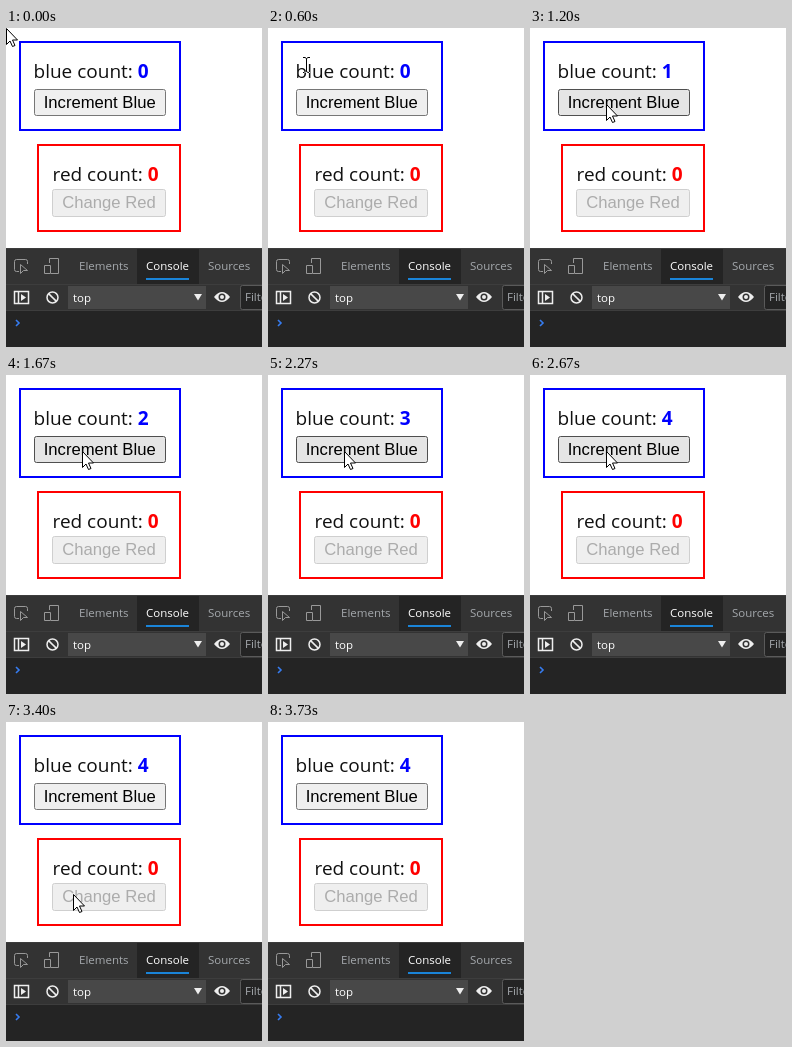
Recreate the animation shown at these times as an HTML page. Size 256 px wide and 319 px high, loop 4.34 s.

```html
<!DOCTYPE html>
<html lang="en">
<head>
<meta charset="utf-8">
<title>Counters</title>
<style>
  html, body { margin: 0; width: 100%; height: 100%; overflow: hidden; background: #fff; }
  svg { display: block; width: 256px; height: 319px; }
  .label { font: 19px "Open Sans", "Noto Sans", sans-serif; fill: #111; }
  .label tspan { font-weight: 700; }
  .button text { font: 16.667px "Liberation Sans", sans-serif; text-anchor: middle; }
  .button rect { fill: #efefef; stroke: #767676; }
  .button.hover rect { fill: #e5e5e5; stroke: #4f4f4f; }
  .button.pressed rect { fill: #f5f5f5; stroke: #8d8d8d; }
  .button.disabled rect { stroke: #cfcfcf; }
  .button.disabled text { fill: #acacac; }
  .tools text { font: 11.5px "Open Sans", "Noto Sans", sans-serif; fill: #a5a9ad; }
  .tools text.bright { fill: #fff; }
  .icon { fill: none; stroke: #999; }
  .icon.light { stroke: #eee; stroke-width: 1.5; }
  #beam { fill: none; stroke: #fff; mix-blend-mode: difference; }
</style>
</head>
<body>
<svg viewBox="0 0 256 319">
  <rect width="256" height="319" fill="#fff"/>

  <rect x="14" y="14" width="160" height="88" fill="none" stroke="#00f" stroke-width="2"/>
  <text class="label" x="27.5" y="50">blue count: <tspan id="count" fill="#00f">0</tspan></text>
  <g class="button" id="increment">
    <rect x="28.5" y="61.5" width="131" height="26" rx="2"/>
    <text x="93.7" y="80">Increment Blue</text>
  </g>

  <rect x="32" y="117" width="142" height="86" fill="none" stroke="#f00" stroke-width="2"/>
  <text class="label" x="46.5" y="153">red count: <tspan fill="#f00">0</tspan></text>
  <g class="button disabled">
    <rect x="46.5" y="161.5" width="113" height="27" rx="2"/>
    <text x="103" y="180">Change Red</text>
  </g>

  <g class="tools">
    <rect y="220" width="256" height="99" fill="#242424"/>
    <rect y="220" width="256" height="63" fill="#333"/>
    <rect x="131" y="220" width="62" height="36" fill="#242424"/>
    <path d="M0 220.5H256M0 256.5H256M0 282.5H256" stroke="#3d3d3d"/>
    <rect x="140" y="250" width="43" height="2" fill="#1a84d8"/>
    <text x="73" y="242">Elements</text>
    <text x="140" y="242" class="bright">Console</text>
    <text x="202" y="242">Sources</text>

    <path class="icon" d="M13 243.5H10.5Q8.5 243.5 8.5 241.5V233.5Q8.5 231.5 10.5 231.5H19.5Q21.5 231.5 21.5 233.5V236M14.5 236.5V245.5L17.5 242.5H21.5Z"/>
    <path class="icon" d="M43.5 235V230.5H52.5V245.5H45M38.5 237.5H44.5V245.5H38.5Z"/>

    <path class="icon light" d="M8.5 263.5H22.5V275.5H8.5ZM12.5 263.5V275.5"/>
    <path d="M15 266L20 269.5L15 273Z" fill="#eee"/>
    <circle class="icon light" cx="46.5" cy="269.5" r="5.5"/>
    <path class="icon light" d="M42.6 265.6L50.4 273.4"/>

    <rect x="62" y="258" width="138" height="23" fill="#484848"/>
    <text x="67" y="274" class="bright">top</text>
    <path d="M188 266H196L192 272.5Z" fill="#eee"/>
    <path d="M208 269Q216 259 224 269Q216 279 208 269Z" fill="#eee"/>
    <circle cx="216" cy="269" r="3.5" fill="#333"/>
    <circle cx="216" cy="269" r="2" fill="#eee"/>
    <rect x="234.5" y="257.5" width="40" height="24" rx="2" fill="#242424" stroke="#5a5a5a"/>
    <text x="239" y="273">Filter</text>
    <path d="M10 292L13 295L10 298" fill="none" stroke="#367cf1" stroke-width="1.6"/>
  </g>

  <path id="arrow" d="M.5.5V16.5L4 13L6.5 18.5L9 17.5L6.5 12H11.5Z" fill="#fff" stroke="#000"/>
  <path id="beam" d="M-3-7.5H-1L.5-6.5L2-7.5H4M.5-6.5V6.5M-3 7.5H-1L.5 6.5L2 7.5H4"/>
</svg>
<script>
const LOOP = 4340;
const TICKS_PER_MS = 15 / 1000;
const [count, increment, arrow, beam] =
  ["count", "increment", "arrow", "beam"].map(id => document.getElementById(id));

// Pointer legs in ticks; the control point bends the path and sets its easing.
const corner = [0, 0], onBlue = [76, 76], onRed = [67, 172], outside = [-40, 295];
const legs = [
  { start: 5, end: 14, from: corner, via: [46, 44], to: onBlue },
  { start: 46, end: 51, from: onBlue, via: [75, 95], to: onRed },
  { start: 51, end: 56, from: onRed, via: [345, 310], to: outside }
];
const clicks = [
  { down: 17, up: 18 }, { down: 24, up: 25 }, { down: 32, up: 34 }, { down: 39, up: 40 }
];

function pointerAt(tick) {
  const { start, end, from, via, to } = legs.findLast(leg => tick >= leg.start) ?? legs[0];
  const u = Math.min(1, Math.max(0, (tick - start) / (end - start)));
  const v = 1 - u;
  return from.map((p, i) => Math.round(v * v * p + 2 * u * v * via[i] + u * u * to[i]));
}

const inside = (x, y, left, top, right, bottom) =>
  x >= left && x < right && y >= top && y < bottom;

function draw(time) {
  // The small lead absorbs tick times rounded to 10 ms.
  const tick = Math.floor((time % LOOP + 5) * TICKS_PER_MS);
  const [x, y] = pointerAt(tick);
  const overText = inside(x, y, 28, 30, 144, 55) || inside(x, y, 46, 134, 153, 159);
  const hover = inside(x, y, 28, 61, 160, 88);
  const pressed = clicks.some(({ down, up }) => tick >= down && tick < up);

  count.textContent = clicks.filter(({ up }) => tick >= up).length;
  increment.setAttribute("class", "button" + (pressed ? " pressed" : hover ? " hover" : ""));
  for (const shape of [arrow, beam]) {
    shape.setAttribute("transform", `translate(${x} ${y})`);
    shape.setAttribute("visibility", (shape === beam) === overText ? "visible" : "hidden");
  }
}

const startTime = performance.now();
function animate() {
  draw(performance.now() - startTime);
  requestAnimationFrame(animate);
}
animate();
</script>
</body>
</html>
```
